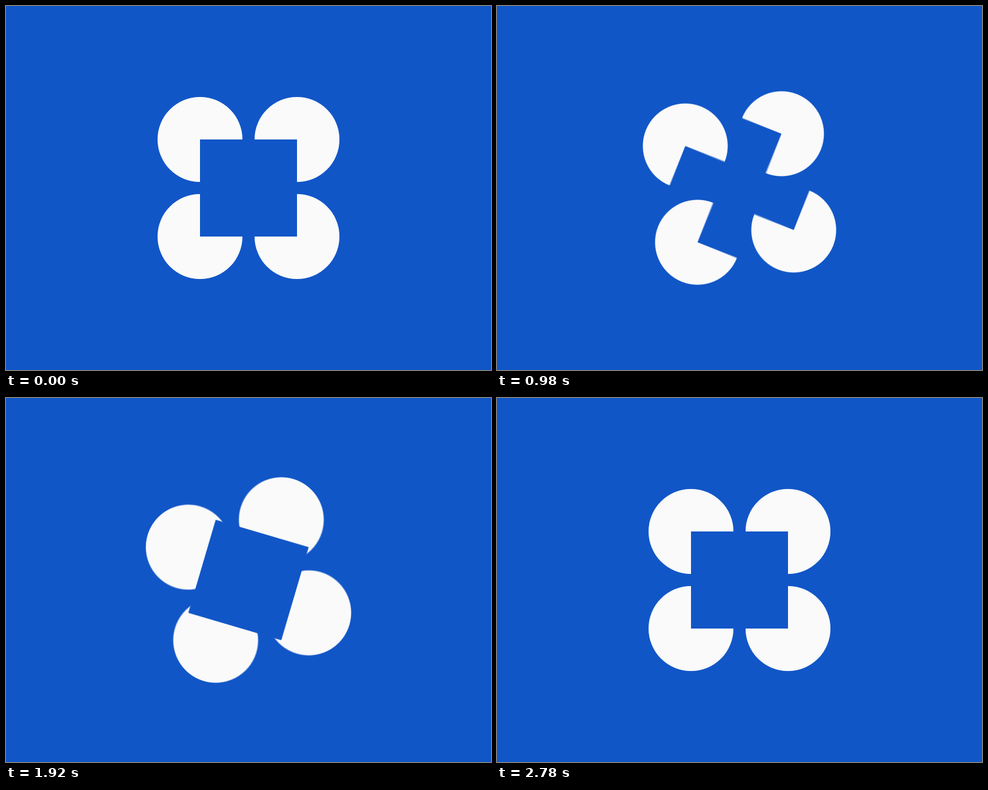
Write an HTML page with a canvas that moves like this. It is 800 by 600 pixels and loops after 2800 ms.

```html
<!DOCTYPE html>
<html lang="en">
<head>
<meta charset="utf-8">
<title>Turning square</title>
<style>
  html, body { margin: 0; width: 100%; height: 100%; overflow: hidden; background: #1156c7; }
  canvas { position: absolute; left: 200px; top: 100px; width: 400px; height: 400px; }
</style>
</head>
<body>
<canvas id="stage" width="400" height="400"></canvas>
<script>
const LOOP = 2800, STEP = 20, HALF = LOOP / 2;
const SIZE = 400, ARM = 80, RADIUS = 70;
const SAMPLES = 15, SHUTTER = 0.5;
const QUARTER = Math.PI / 2;

const stage = document.getElementById('stage').getContext('2d');
const layer = document.createElement('canvas');
layer.width = layer.height = SIZE;
const pen = layer.getContext('2d');

const ease = x => x < 0.5
  ? 0.5 * Math.pow(2 * x, 3.5)
  : 1 - 0.5 * Math.pow(2 - 2 * x, 3.5);

// Runs draw at each of the four corners of a square turned by angle.
function atCorners(angle, draw) {
  for (let i = 0; i < 4; i++) {
    pen.save();
    pen.rotate(angle + i * QUARTER);
    pen.translate(-ARM, -ARM);
    pen.beginPath();
    draw();
    pen.fill();
    pen.restore();
  }
}

// The group turns a quarter clockwise while each notch turns three quarters back.
function drawNotched(p) {
  const notch = -4 * QUARTER * p;
  atCorners(QUARTER * p, () => {
    pen.moveTo(0, 0);
    pen.arc(0, 0, RADIUS, notch + QUARTER, notch + 4 * QUARTER);
    pen.closePath();
  });
}

// Whole discs turn one way, the square cut-out turns the other.
function drawCutOut(p) {
  atCorners(-QUARTER * p, () => pen.arc(0, 0, RADIUS, 0, 4 * QUARTER));
  pen.globalCompositeOperation = 'destination-out';
  pen.rotate(QUARTER * p);
  pen.fillRect(-ARM, -ARM, 2 * ARM, 2 * ARM);
}

function drawPose(ms) {
  pen.clearRect(0, 0, SIZE, SIZE);
  pen.save();
  pen.translate(SIZE / 2, SIZE / 2);
  pen.fillStyle = '#fff';
  const p = ease((ms % HALF) / HALF);
  if (ms % LOOP < HALF) drawNotched(p);
  else drawCutOut(p);
  pen.restore();
}

// Averages several poses within the open shutter for motion blur.
function render(ms) {
  stage.globalCompositeOperation = 'source-over';
  stage.clearRect(0, 0, SIZE, SIZE);
  stage.globalCompositeOperation = 'lighter';
  stage.globalAlpha = 1 / SAMPLES;
  for (let i = 0; i < SAMPLES; i++) {
    drawPose(ms + STEP * SHUTTER * i / SAMPLES);
    stage.drawImage(layer, 0, 0);
  }
  stage.globalAlpha = 1;
  stage.globalCompositeOperation = 'source-in';
  stage.fillStyle = '#fafafa';
  stage.fillRect(0, 0, SIZE, SIZE);
}

const start = performance.now();
let shown = -1;

function tick() {
  const elapsed = (performance.now() - start + 0.5) % LOOP;
  const time = Math.floor(elapsed / STEP) * STEP;
  if (time !== shown) render(shown = time);
  requestAnimationFrame(tick);
}
tick();
</script>
</body>
</html>
```
